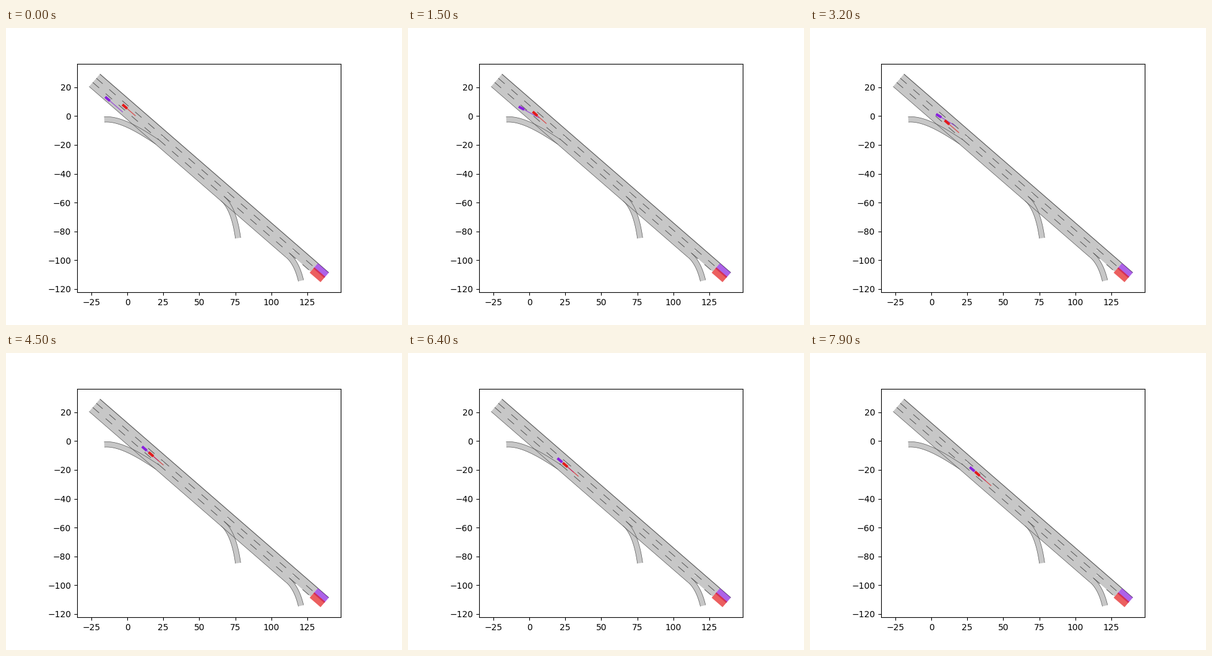
Write a matplotlib script that moves like this. It is 640 px wide and 480 px high and loops after 8 s.

```python
import numpy as np
import matplotlib.pyplot as plt
from matplotlib.animation import FuncAnimation
from matplotlib.patches import Polygon

FRAMES, STEP = 80, 100
ROAD, EDGE, LIGHT = "#c7c7c7", "#555555", "#dddddd"
RED, PURPLE = "#e31b1b", "#8a1fdf"

# Road frame in metres: s runs along the road, lanes count from the top edge
ANGLE = np.radians(-40.95)
ALONG = np.array([np.cos(ANGLE), np.sin(ANGLE)])
ACROSS = np.array([ALONG[1], -ALONG[0]])
START = np.array([-19.0, 29.2])
LANE = 3.81
SECTIONS = 61, 121, 181
GOAL, END = 200.4, 210.4

fig = plt.figure(figsize=(6.4, 4.8), dpi=100)
ax = fig.add_subplot()
ax.set_aspect("equal")
ax.set_xlim(-34.824, 148.226)
ax.set_ylim(-122.344, 36.456)


def at(s, lane):
    return START + s * ALONG + lane * LANE * ACROSS


def fill(points, color, z, alpha=1):
    patch = Polygon(points, fc=color, ec="none", lw=0, alpha=alpha, zorder=z)
    return ax.add_patch(patch)


def stroke(points, color=EDGE, lw=0.5, z=3, **kw):
    return ax.plot(*np.transpose(points), color=color, lw=lw, zorder=z,
                   solid_capstyle="butt", **kw)[0]


def box(s0, s1, lane0, lane1):
    return [at(s0, lane0), at(s1, lane0), at(s1, lane1), at(s0, lane1)]


def bezier(*points):
    """De Casteljau evaluation for any number of control points."""
    t = np.linspace(0, 1, 40)[:, None]
    level = [np.asarray(p) + 0 * t for p in points]
    while len(level) > 1:
        level = [a + (b - a) * t for a, b in zip(level, level[1:])]
    return level[0]


def ramp(*points, width=3.7):
    mid = bezier(*points)
    d = np.gradient(mid, axis=0)
    d /= np.hypot(*d.T)[:, None]
    side = np.c_[-d[:, 1], d[:, 0]] * width / 2
    fill(np.r_[mid + side, (mid - side)[::-1]], ROAD, 1)
    stroke(mid + side)
    stroke(mid - side)


def exit_ramp(s, bend, end):
    ramp(at(s, 2.5), at(s + bend, 2.5), end)


# Three lanes, two after the last exit
fill(box(0, SECTIONS[-1], 0, 3), ROAD, 1)
fill(box(SECTIONS[-1], GOAL, 0, 2), ROAD, 1)
stroke([at(0, 0), at(END, 0)], lw=0.8)
stroke([at(0, 3), at(SECTIONS[-1], 3)])

ramp((-16, -2.3), (-5.2, -1.5), (7.7, -9.3), at(SECTIONS[0], 2.5))
exit_ramp(SECTIONS[1], 10.5, (76.9, -84.7))
exit_ramp(SECTIONS[2], 8.3, (120.6, -114.3))

# Lane markings restart with every section
stops = (0, *SECTIONS, GOAL)
for s0, s1 in zip(stops, stops[1:]):
    for lane in (1, 2):
        stroke([at(s0, lane), at(s1, lane)], lw=0.7, dashes=(14, 14.5))
for s in SECTIONS:
    fill([at(s, 0.85), at(s, 1.35), at(s + 1.9, 1.1)], LIGHT, 2)

# Goal areas
fill(box(GOAL, END, 0, 1.27), PURPLE, 4, 0.7)
fill(box(GOAL, END, 0.98, 2.29), RED, 5, 0.7)


def smooth(u):
    u = np.clip(u, 0, 1)
    return u * u * (3 - 2 * u)


def red_pos(t):
    return at(27.8 + 4.95 * t + 0.0895 * t * t, 1.5)


def purple_pos(t):
    return at(15.3 + 7 * t - 0.047 * t * t, 2.5 - smooth((t - 0.8) / 2.9))


class Car:
    """A box heading along its path, with its next two seconds as a line."""
    LENGTH, WIDTH, AHEAD = 4.3, 1.8, 2

    def __init__(self, pos, color, z):
        self.pos = pos
        self.line = stroke([(0, 0)], color, 0.8, z, alpha=0.8)
        self.body = fill(np.zeros((4, 2)), color, z)

    def draw(self, t):
        c = self.pos(t)
        v = (self.pos(t + 0.05) - self.pos(t - 0.05)) / 0.1
        d = v / np.hypot(*v)
        n = np.array([-d[1], d[0]])
        f, w = d * self.LENGTH / 2, n * self.WIDTH / 2
        self.body.set_xy([c - f - w, c + f - w, c + f + w, c - f + w])
        self.line.set_data(*np.transpose([c, c + v * self.AHEAD]))
        return self.line, self.body


cars = [Car(purple_pos, PURPLE, 6), Car(red_pos, RED, 7)]


def draw(i):
    t = i * STEP / 1000
    return [part for car in cars for part in car.draw(t)]


anim = FuncAnimation(fig, draw, frames=FRAMES, interval=STEP, repeat=True,
                     repeat_delay=0, blit=False)
plt.show()
```
